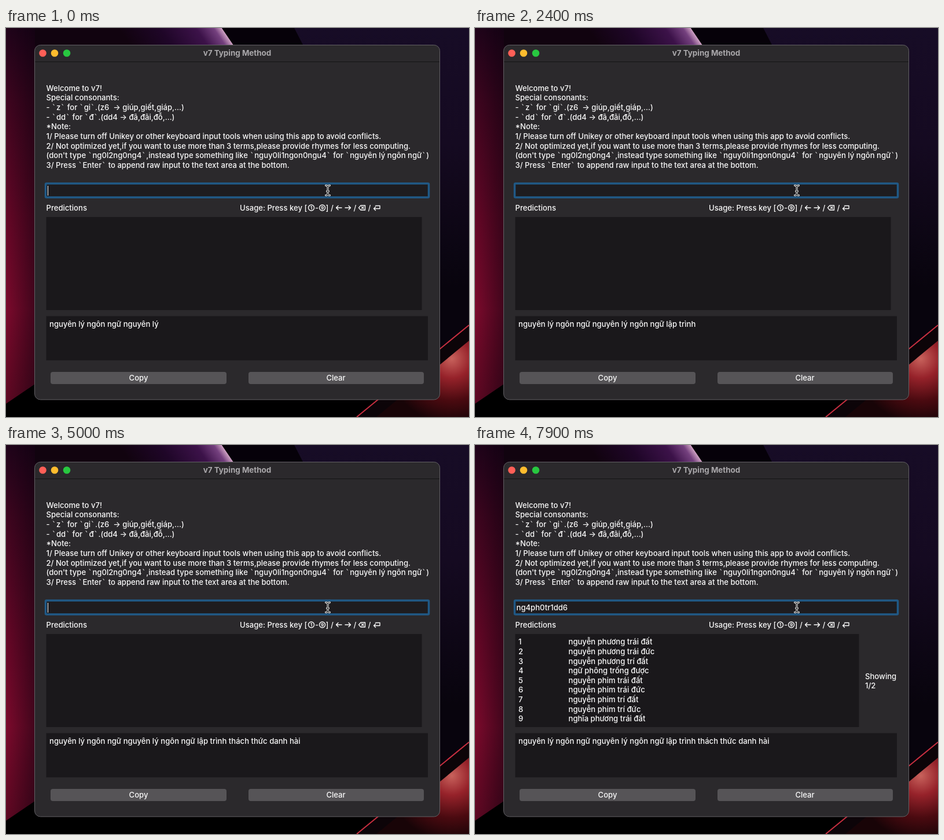
An HTML page that plays this animation: 800 by 673 pixels, repeating every 8000 ms.

```html
<!DOCTYPE html>
<html lang="vi">
<head>
<meta charset="utf-8">
<title>v7 Typing Method</title>
<style>
html, body { margin: 0; width: 100%; height: 100%; overflow: hidden; background: #000; }
svg { display: block; width: 800px; height: 673px; }
text { font: 500 13.1px Inter, "Noto Sans", "DejaVu Sans", sans-serif; fill: #fafafa; white-space: pre; }
.tick { font-family: "DejaVu Sans Mono", monospace; }
.title { font-size: 13.4px; font-weight: 700; fill: #aaa8ab; }
.mid { text-anchor: middle; }
.icon { fill: none; stroke: #fafafa; stroke-width: 1.4; stroke-linecap: round; stroke-linejoin: round; }
.icon text { font-size: 8px; font-weight: 700; stroke: none; }
.field { fill: #1a181b; }
.button { fill: #565457; }
</style>
</head>
<body>
<svg viewBox="0 0 800 673">
  <defs>
    <linearGradient id="left" x2="0" y2="1">
      <stop offset="0" stop-color="#20031a"/><stop offset=".2" stop-color="#40051f"/>
      <stop offset=".5" stop-color="#650726"/><stop offset=".75" stop-color="#7c0a2c"/>
      <stop offset="1" stop-color="#5e0822"/>
    </linearGradient>
    <linearGradient id="shade">
      <stop offset="0" stop-color="#08010c" stop-opacity="0"/><stop offset="1" stop-color="#08010c" stop-opacity=".6"/>
    </linearGradient>
    <linearGradient id="top" gradientUnits="userSpaceOnUse" x1="250" y1="83" x2="373" y2="0">
      <stop offset="0" stop-color="#11030f"/><stop offset=".4" stop-color="#1f0628"/>
      <stop offset=".75" stop-color="#3c1249"/><stop offset=".92" stop-color="#74407e"/>
      <stop offset="1" stop-color="#d0a3c4"/>
    </linearGradient>
    <linearGradient id="right" x2="0" y2="1">
      <stop offset="0" stop-color="#170c26"/><stop offset=".35" stop-color="#150a21"/>
      <stop offset=".8" stop-color="#08040d"/>
    </linearGradient>
    <radialGradient id="glow" gradientUnits="userSpaceOnUse" cx="770" cy="572" r="112">
      <stop offset="0" stop-color="#c8625c"/><stop offset=".3" stop-color="#96222a"/>
      <stop offset=".65" stop-color="#4a0a10"/><stop offset="1" stop-color="#180407"/>
    </radialGradient>
  </defs>

  <rect width="800" height="673"/>
  <path d="M0 0H60V609L0 650Z" fill="url(#left)"/>
  <path d="M0 0H60V609L0 650Z" fill="url(#shade)"/>
  <path d="M50 0H373L394 31H50Z" fill="url(#top)"/>
  <path d="M373 0H498L514 31H394Z" fill="#060109"/>
  <path d="M498 0H800V514L740 563V31H514Z" fill="url(#right)"/>
  <path d="M800 514V673H606Z" fill="#0c0408"/>
  <path d="M800 541V673H640Z" fill="url(#glow)"/>
  <path d="M606 673L800 514" stroke="#c92f40" stroke-width="2"/>

  <rect x="49.5" y="29.5" width="700" height="613.5" rx="10" fill="#2b292c" stroke="#626064"/>
  <path d="M50 58.5H749" stroke="#151416"/>
  <circle cx="63.5" cy="43.5" r="6.3" fill="#ff5f57"/>
  <circle cx="84" cy="43.5" r="6.3" fill="#febc2e"/>
  <circle cx="105" cy="43.5" r="6.3" fill="#28c840"/>
  <text class="title mid" x="399.5" y="48">v7 Typing Method</text>
  <g id="intro"></g>

  <rect x="68.5" y="269" width="662" height="24" rx="1.5" fill="#1e1c1f" stroke="#205986" stroke-width="3.5"/>
  <text id="input" x="71.5" y="286"></text>
  <path id="caret" d="M0 273V290" stroke="#fafafa"/>
  <g fill="none" stroke-linecap="round">
    <path id="beam" d="M552.5 272.5Q556 272.5 556 275.5Q556 272.5 559.5 272.5M556 275V287M552.5 289.5Q556 289.5 556 286.5Q556 289.5 559.5 289.5M554.5 282.5H557.5" stroke="#fff" stroke-width="2.9"/>
    <path d="M552.5 272.5Q556 272.5 556 275.5Q556 272.5 559.5 272.5M556 275V287M552.5 289.5Q556 289.5 556 286.5Q556 289.5 559.5 289.5M554.5 282.5H557.5" stroke="#111" stroke-width="1.1"/>
  </g>

  <text x="69.5" y="315.5">Predictions</text>
  <text x="404" y="315.5">Usage: Press key [</text>
  <text y="315.5"><tspan x="534">-</tspan><tspan x="552.5">]</tspan><tspan x="561">/</tspan><tspan x="600.5">/</tspan><tspan x="625.5">/</tspan></text>
  <g class="icon">
    <circle cx="527.5" cy="311" r="5"/><text class="mid" x="527.5" y="314">1</text>
    <circle cx="546.5" cy="311" r="5"/><text class="mid" x="546.5" y="314">9</text>
    <path d="M580 311H570.5M574 307.5L570.5 311L574 314.5M586 311H595.5M592 307.5L595.5 311L592 314.5"/>
    <path d="M609.5 311L613 307H620.5V315H613ZM614.5 309.3L618 312.7M618 309.3L614.5 312.7"/>
    <path d="M638.5 307.5H646V312.5H635.5M638.5 309.5L635.5 312.5L638.5 315.5"/>
  </g>

  <rect id="list" class="field" x="69.5" y="327" width="649" height="161"/>
  <g id="rows"></g>
  <rect class="field" x="69.5" y="498.5" width="659.5" height="76.5"/>
  <text id="output" x="75" y="516.5"></text>
  <rect class="button" x="77" y="595" width="304" height="21" rx="4"/>
  <rect class="button" x="419" y="595" width="303" height="21" rx="4"/>
  <text class="mid" x="229" y="609.5">Copy</text>
  <text class="mid" x="570" y="609.5">Clear</text>
</svg>
<script>
const $ = id => document.getElementById(id);
const svgEl = name => document.createElementNS('http://www.w3.org/2000/svg', name);
const LOOP = 8000, BLINK = 500, LINE = 16.63;

// Backticks are set in a monospaced face, which gives them their wide advance.
function addText(parent, x, y, content) {
  const el = svgEl('text');
  el.setAttribute('x', x);
  el.setAttribute('y', y);
  for (const part of String(content).split(/(`)/)) {
    const span = svgEl('tspan');
    if (part === '`') span.setAttribute('class', 'tick');
    span.textContent = part;
    el.append(span);
  }
  parent.append(el);
}

[
  'Welcome to v7!',
  'Special consonants:',
  '- `z` for `gi`.(z6  → giúp,giết,giáp,...)',
  '- `dd` for `đ`.(dd4 → đã,đãi,đỗ,...)',
  '*Note:',
  '1/ Please turn off Unikey or other keyboard input tools when using this app to avoid conflicts.',
  '2/ Not optimized yet,if you want to use more than 3 terms,please provide rhymes for less computing.',
  "(don't type `ng0l2ng0ng4`,instead type something like `nguy0li1ngon0ngu4` for `nguyên lý ngôn ngữ`)",
  '3/ Press `Enter` to append raw input to the text area at the bottom.'
].forEach((line, i) => addText($('intro'), 69.5, 108.8 + i * LINE, line));

// Each entry: typed keys, time of each key, time of the choice, predictions, pages.
const entries = [
  ['ng0ng4', [150, 250, 400, 500, 600, 750], 1000, ['ngôn ngữ'], 1],
  ['l7tr2', [1150, 1250, 1350, 1450, 1600], 1800, ['lập trình', 'lịch trình'], 1],
  ['th6th6', [2500, 2600, 2800, 2950, 3050, 3250], 3800, ['thách thức', 'thất thoát'], 1],
  ['d0h2', [4050, 4200, 4350, 4500], 4900, ['danh hài', 'dung hòa'], 1],
  ['ng4ph0tr1dd6', [5050, 5120, 5220, 5320, 5400, 5500, 5600, 5680, 6500, 6800, 6950, 7250], LOOP, [
    'nguyễn phương trái đất', 'nguyễn phương trái đức', 'nguyễn phương trí đất',
    'ngữ phông trống được', 'nguyễn phim trái đất', 'nguyễn phim trái đức',
    'nguyễn phim trí đất', 'nguyễn phim trí đức', 'nghĩa phương trái đất'], 2]
];

function stateAt(t) {
  const s = { input: '', output: 'nguyên lý ngôn ngữ nguyên lý', words: none, pages: 0, last: 0 };
  for (const [keys, times, chosen, words, pages] of entries) {
    if (t >= chosen) {
      s.output += ' ' + words[0];
      s.last = chosen;
      continue;
    }
    const n = times.filter(k => k <= t).length;
    if (n) s.last = times[n - 1];
    s.input = keys.slice(0, n);
    if (n === keys.length) Object.assign(s, { words, pages });
    break;
  }
  return s;
}

const none = [];
let shown = none;
function showWords(words, pages) {
  if (words === shown) return;
  shown = words;
  const rows = $('rows');
  rows.replaceChildren();
  $('list').setAttribute('width', pages ? 594 : 649);
  words.forEach((word, i) => {
    addText(rows, 75, 345.3 + i * LINE, i + 1);
    addText(rows, 161.5, 345.3 + i * LINE, word);
  });
  if (pages) {
    addText(rows, 674, 404.5, 'Showing');
    addText(rows, 674, 421, '1/' + pages);
  }
}

function draw() {
  const t = performance.now() % LOOP, s = stateAt(t);
  $('input').textContent = s.input;
  $('output').textContent = s.output;
  showWords(s.words, s.pages);
  const x = 72.5 + $('input').getComputedTextLength();
  $('caret').setAttribute('transform', `translate(${x})`);
  $('caret').style.opacity = (t - s.last) % (2 * BLINK) < BLINK ? 1 : 0;
  requestAnimationFrame(draw);
}
draw();
</script>
</body>
</html>
```
